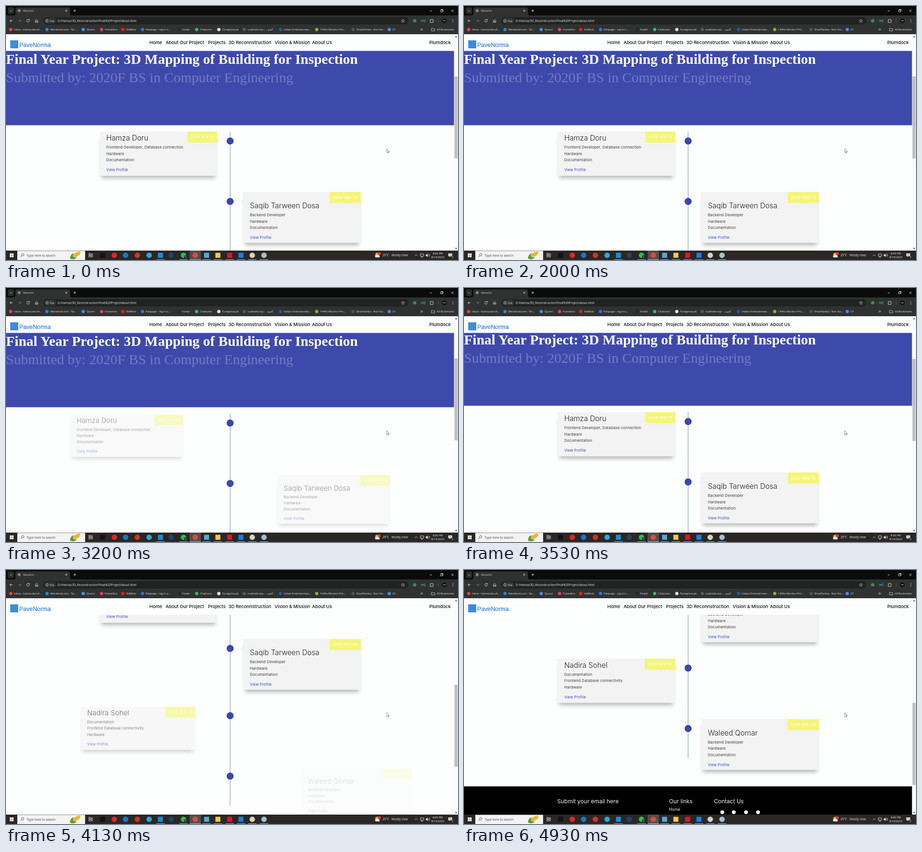
Recreate the animation shown at these times as an HTML page. Size 960 px wide and 540 px high, loop 4990 ms.

```html
<!DOCTYPE html>
<html lang="en">
<head>
<meta charset="utf-8">
<title>AboutUs</title>
<style>
html, body { margin: 0; width: 100%; height: 100%; overflow: hidden; background: #fdfefe; }
svg { display: block; width: 960px; height: 540px; }
text { font-family: "Open Sans", "Noto Sans", sans-serif; white-space: pre; }
.page text { font-family: Inter, "Open Sans", sans-serif; }
.page .serif { font-family: "Liberation Serif", "Times New Roman", serif; }
.page .brand { font-family: "Liberation Sans", Arial, sans-serif; }
.page .body { letter-spacing: .12px; }
</style>
</head>
<body>
<svg id="stage" viewBox="0 0 960 540"></svg>
<script>
const text = (x, y, size, color, str, extra = '') =>
  `<text x="${x}" y="${y}" font-size="${size}" fill="${color}" ${extra}>${str}</text>`;
const rect = (x, y, w, h, color, extra = '') =>
  `<rect x="${x}" y="${y}" width="${w}" height="${h}" fill="${color}" ${extra}/>`;
const dot = (x, y, r, color) => `<circle cx="${x}" cy="${y}" r="${r}" fill="${color}"/>`;
const line = (d, color = '#e3e3e3', w = .9, extra = '') =>
  `<path d="${d}" fill="none" stroke="${color}" stroke-width="${w}" ${extra}/>`;
const shape = (d, color) => `<path d="${d}" fill="${color}"/>`;

// ---- Scrolling page ----
const LINE_X = 476, DURATION = 700, RELOAD = 2730, LOADED = 2930, LOOP = 4990;
const cards = [
  { side: -1, y: 287, start: 2790, name: 'Hamza Doru', id: '111', badge: 63,
    jobs: ['Frontend Developer, Database connection', 'Hardware', 'Documentation'] },
  { side: 1, y: 415.5, start: 2790, name: 'Saqib Tarween Dosa', id: '114', badge: 65.5,
    jobs: ['Backend Developer', 'Hardware', 'Documentation'] },
  { side: -1, y: 558.5, start: 3618, name: 'Nadira Sohel', id: '117', badge: 64.5,
    jobs: ['Documentation', 'Frontend Database connectivity', 'Hardware'] },
  { side: 1, y: 687, start: 3928, name: 'Waleed Qomar', id: '124', badge: 66.5,
    jobs: ['Backend Developer', 'Hardware', 'Documentation'] },
];

function card(c) {
  const left = c.side < 0, x = left ? 198.5 : 503.5, w = 250;
  const top = c.y - 20, h = left ? 94 : 108, head = top + (left ? 19 : 34.5);
  c.cx = x + w / 2;
  c.cy = top + h / 2;
  const edge = left ? x + w : x;
  return `<g class="card">` +
    rect(x + 4, top + 14, w - 8, h - 9, '#000', 'opacity=".27" filter="url(#soft)"') +
    rect(x, top, w, h, '#f2f3f2') +
    shape(`M${edge} ${c.y - 5}l${-5 * c.side} 5l${5 * c.side} 5z`, '#f2f3f2') +
    rect(x + w - c.badge, top, c.badge, 23.5, '#f4f578') +
    text(x + w - c.badge / 2, top + 14.2, 7.1, '#fff', '2020F-BCE-' + c.id, 'text-anchor="middle"') +
    text(x + 14.5, head, 15.4, '#222', c.name, 'font-weight="300"') +
    c.jobs.map((job, i) => text(x + 14.5, head + 17.3 + i * 13.5, 8, '#3a3a3a', job, 'class="body"')).join('') +
    text(x + 14.5, head + 65.3, 7.9, '#3c49bd', 'View Profile', 'class="body"') + '</g>';
}

const page = `<g class="page"><g id="scroll">` +
  rect(0, -300, 952, 553.5, '#3e49ac') +
  text(0, 123, 30, '#fff', 'Final Year Project: 3D Mapping of Building for Inspection', 'class="serif" font-weight="700"') +
  text(0, 162, 30, '#727bc2', 'Submitted by: 2020F BS in Computer Engineering', 'class="serif"') +
  rect(LINE_X - 1.2, 267, 2.4, 483, '#c5c6e4') +
  cards.map(c => dot(LINE_X, c.y, 7.5, '#3b47aa')).join('') +
  cards.map(card).join('') +
  rect(0, 810, 952, 200, '#000') +
  text(198, 845.5, 12, '#f4f4f4', 'Submit your email here') +
  text(435.5, 845.5, 12, '#f4f4f4', 'Our links') +
  text(531, 845.5, 12, '#f4f4f4', 'Contact Us') +
  text(435.5, 862.3, 8.5, '#f4f4f4', 'Home') +
  [548.5, 573, 599, 624.5].map(x => dot(x, 865, 4, '#fff')).join('') + '</g>' +
  rect(0, 60, 952, 35.5, '#fdfefe') +
  rect(9, 73, 17, 17, '#3d8be0') +
  text(28, 87, 12.7, '#3484e0', 'PaveNorma', 'class="brand" stroke="#3484e0" stroke-width=".25"') +
  [[304.5, 'Home'], [339, 'About Our Project'], [429, 'Projects'], [472.5, '3D Reconnstruction'],
   [570.5, 'Vision &amp; Mission'], [650, 'About Us'], [899, 'Plumdock']]
    .map(([x, label]) => text(x, 81.2, 9.6, '#111', label, 'font-weight="500"')).join('') +
  rect(951.5, 60, 8.5, 460, '#fbfbfb') +
  rect(952.4, 149.5, 6.8, 174.5, '#c0c0c0', 'id="thumb"') +
  shape('M953.5 66.5h5l-2.5-3z', '#555') + shape('M953.5 514.5h5l-2.5 3z', '#555') + '</g>';

// ---- Browser frame ----
const bookmarks = [
  [10, '#e5473c', 17, 'Inbox - hamza.doru4...'], [87, '#2488d8', 94, 'Wendmail.com - Tar...'],
  [164, '#4a8af0', 171, 'Quorvi'], [203, '#d6417d', 210, 'Framelino'], [248, '#f01c1c', 255, 'VidMolo'],
  [290, '#2478ee', 296.5, 'Palspage – log in o...'], [368, '#24292e', 374, 'Forkel'],
  [405, '#2cc45a', 412, 'Chatlumo'], [452, '#e6e6e6', 459, 'Tunegrove.pk'],
  [506, '#3d6657', 513, 'oudmelo.top - ...أغنية'], [583, '#245a9e', 590, 'Indian Entertainmen...'],
  [660, '#7cb83c', 667, '144Hz Monitor Pric...'], [737, '#4b5263', 744, 'ShowTamba - Non Sto...'],
  [814, '#4a8af0', 820.5, 'CV'],
];
const globe = (x, y) => dot(x, y, 3.2, '#777') + line(`M${x - 2.5} ${y - 1}l3 1l2 -2M${x - 1} ${y + 2.5}l1 -2`, '#ccc', .6);

const browser = rect(0, 0, 960, 21, '#090c0b') +
  rect(4, 3, 13, 14, '#2c2e2e', 'rx="4"') + line('M8.5 9.5l2 2l2 -2') +
  shape('M16 20q4 0 4 -4v-9q0 -4 4 -4h108q4 0 4 4v9q0 4 4 4z', '#303131') +
  globe(28, 10) + text(36, 12.3, 5.8, '#e6e6e6', 'AboutUs') +
  line('M126 8l4 4m0 -4l-4 4M143.2 10h5.6M146 7.2v5.6') +
  line('M900 10.5h4.5M923 8.5h4v4h-4zM924.3 8.3v-1h4v4h-1M946 8l4.5 4.5m0 -4.5l-4.5 4.5') +
  rect(0, 20, 960, 40, '#303131') +
  line('M14 31.5h-5.5m2.5 -2.7l-2.7 2.7l2.7 2.7') +
  line('M26.2 31.5h5.5m-2.5 -2.7l2.7 2.7l-2.7 2.7', '#7d7d7d') +
  line('M49.4 29.8a2.9 2.9 0 1 0 .4 2.2M49.8 28v2.2h-2.2', '#e3e3e3', .9, 'id="reload"') +
  line('M45 29.2l4.4 4.4m0 -4.4l-4.4 4.4', '#e3e3e3', .9, 'id="stop"') +
  line('M62.3 31.2l2.7 -2.5l2.7 2.5v3.4h-1.8v-2h-1.8v2h-1.8z') +
  rect(79, 23.8, 776, 15.4, '#212222', 'rx="7.7"') +
  rect(82, 25.5, 24.5, 12, '#343535', 'rx="6"') +
  '<circle cx="87" cy="31.5" r="2.8" fill="none" stroke="#ddd" stroke-width=".7"/>' + line('M87 31v2M87 29.6v.7', '#ddd', .7) +
  text(93, 33.7, 6, '#e6e6e6', 'File') +
  text(109.5, 33.7, 6.2, '#eee', 'D:/Hamza/3D_Reconstruction/Final%20Project/about.html') +
  line('M843 28.2l1 2.2l2.4 .2l-1.8 1.6l.6 2.4l-2.2 -1.3l-2.2 1.3l.6 -2.4l-1.8 -1.6l2.4 -.2z', '#ddd', .7) +
  dot(868, 31.5, 3.6, '#1e9e43') + dot(885, 31.5, 1.3, '#35b7de') +
  line('M887 29a4 4 0 0 1 0 5M889 28a6 6 0 0 1 0 7M883 29a4 4 0 0 0 0 5', '#35b7de', .8) +
  line('M901 29h2q1 -2 2 0h2v2q2 1 0 2v2h-6v-2q1.5 -1 0 -2z', '#e3e3e3') +
  line('M918 27.5v8', '#666', .7) +
  dot(931, 31.5, 5, '#0b1112') + rect(928, 30.5, 6, 1.8, '#4c9a8c') +
  [28.8, 31.5, 34.2].map(y => dot(949, y, .75, '#e3e3e3')).join('') +
  bookmarks.map(([ix, color, x, label]) => dot(ix, 50, 3.5, color) + text(x, 52.1, 5.6, '#e6e6e6', label)).join('') +
  line('M880.5 48l2 2l-2 2M883 48l2 2l-2 2') +
  line('M903.7 47.5h2.5l1 1h3.3v4.5h-6.8z', '#ddd', .8) +
  text(915, 52.1, 5.5, '#e6e6e6', 'All Bookmarks');

// ---- Taskbar ----
const apps = [
  [205, '#111314', 1], [230, '#e4252b'], [254, '#1677d2'], [279, '#d2331f'], [304, '#2ea5df'],
  [328, '#2389d7', 1], [351, '#1d4568'], [377, '#28bd55'], [402, '#e2483a'], [426, '#56a8d6', 1],
  [450, '#f2c94b', 1], [475, '#e8112d', 1], [499, '#1d7edb', 1], [523, '#d9d2bd'], [548, '#a9bfca'],
];
const taskbar = rect(0, 520, 960, 20, '#2a2725') +
  [[8, 526], [12.3, 526], [8, 530.3], [12.3, 530.3]].map(([x, y]) => rect(x, y, 3.8, 3.8, '#fff')).join('') +
  rect(24, 520.5, 144, 19.5, '#f3f3f3') +
  '<circle cx="35.5" cy="528.8" r="2.5" fill="none" stroke="#333" stroke-width=".8"/>' + line('M33.7 530.7l-2.7 2.8', '#333') +
  text(44, 532.6, 6.7, '#444', 'Type here to search') +
  '<g transform="translate(147 530) rotate(-32)"><ellipse cx="2" rx="11" ry="4.3" fill="#f1c335"/>' +
  line('M-4 -1.5h15M-4 1.5h15M-2 -3v6M2 -4v8M6 -4v8M10 -3v6', '#d59b23', .6) +
  shape('M-13 0q5 -8 13 -5q-6 2 -5 5q0 4 6 6q-9 2 -14 -6', '#5d963d') + '</g>' +
  line('M176 526.5h5.5v2.5h-5.5zM176 530.5h5.5v3h-5.5zM183.7 526v8M176 525h1', '#e8e8e8', .9) +
  rect(390, 520, 24, 20, '#514e4c') +
  apps.map(([x, color, square]) => square ? rect(x - 5.3, 524.7, 10.6, 10.6, color) : dot(x, 530, 5.8, color)).join('') +
  dot(381.5, 533.5, 3.4, '#313131') + text(380.2, 535.6, 5.3, '#fff', '1') +
  [328, 377, 426, 450, 475, 499, 523, 548].map(x => rect(x - 9, 538.8, 18, 1.2, '#79add2')).join('') +
  rect(390, 538.8, 24, 1.2, '#8bbce0') +
  dot(788.5, 529, 4.5, '#f2a52f') + shape('M785 534.5a2.5 2.5 0 0 1 1 -4.7a4 4 0 0 1 7 1.5a1.8 1.8 0 0 1 0 3.2z', '#dfe8f2') +
  dot(793, 526.7, 3.2, '#d93b36') +
  text(799.7, 532.4, 6.3, '#f2f2f2', '29°C') + text(819, 532.4, 6.3, '#f2f2f2', 'Mostly clear') +
  line('M868.5 531.3l2.7 -2.7l2.7 2.7M880 527h7v5h-7zM882 534.3h3M883.5 532v2') +
  shape('M891.5 528.5h1.7l2.3 -2.2v7.4l-2.3 -2.2h-1.7z', '#eee') +
  line('M897 528a3 3 0 0 1 0 4M898.5 526.7a5 5 0 0 1 0 6.6', '#eee', .7) +
  text(917, 527.6, 5.8, '#f4f4f4', '8:06 PM', 'text-anchor="middle"') +
  text(917, 536.4, 5.8, '#f4f4f4', '8/14/2024', 'text-anchor="middle"') +
  shape('M939.5 526h8v6h-4l-1.7 2v-2h-2.3z', '#f2f2f2') + line('M941 528h5M941 530h5', '#444', .6) +
  dot(948.3, 533.7, 3, '#3a3a3a') + text(946.9, 535.5, 4.8, '#fff', '1');

const pointer = '<path d="M808.8 303.5v8.2l1.8 -1.6l1.2 2.8l1.3 -.6l-1.2 -2.7h2.5z" fill="#fff" stroke="#333" stroke-width=".6"/>';

const stage = document.getElementById('stage');
stage.innerHTML = '<defs><filter id="soft" x="-20%" y="-30%" width="140%" height="160%"><feGaussianBlur stdDeviation="4.5"/></filter></defs>' +
  page + browser + taskbar + pointer;

// ---- Motion ----
const find = id => document.getElementById(id);
const scroller = find('scroll'), thumb = find('thumb'), reload = find('reload'), stop = find('stop');
const cardNodes = document.querySelectorAll('.card');

// time, offset, speed
const knots = [[3470, 0, 0], [3530, 3, .15], [3730, 102.5, .42], [4130, 248.5, .32], [4760, 350, 0]];

function scrollAt(t) {
  if (t <= knots[0][0]) return 0;
  const i = knots.findIndex(k => k[0] >= t);
  if (i < 0) return 350;
  const [t0, s0, v0] = knots[i - 1], [t1, s1, v1] = knots[i];
  const d = t1 - t0, u = (t - t0) / d, q = 1 - u;
  return q * q * ((1 + 2 * u) * s0 + u * d * v0) + u * u * ((3 - 2 * u) * s1 - q * d * v1);
}

function draw(now) {
  const t = now % LOOP, offset = scrollAt(t);
  scroller.setAttribute('transform', `translate(0 ${-offset})`);
  thumb.setAttribute('y', 149.5 + offset * .38);
  const loading = t >= RELOAD && t < LOADED;
  reload.style.display = loading ? 'none' : '';
  stop.style.display = loading ? '' : 'none';
  cards.forEach((c, i) => {
    const p = t < RELOAD ? 1 : Math.min(1, Math.max(0, (t - c.start) / DURATION));
    const x = c.cx + c.side * 163 * (1 - p);
    cardNodes[i].setAttribute('opacity', p ** 1.5);
    cardNodes[i].setAttribute('transform',
      `translate(${x} ${c.cy}) scale(${.9 + .1 * p}) translate(${-c.cx} ${-c.cy})`);
  });
  requestAnimationFrame(() => draw(performance.now() - begin));
}
const begin = performance.now();
draw(0);
</script>
</body>
</html>
```
